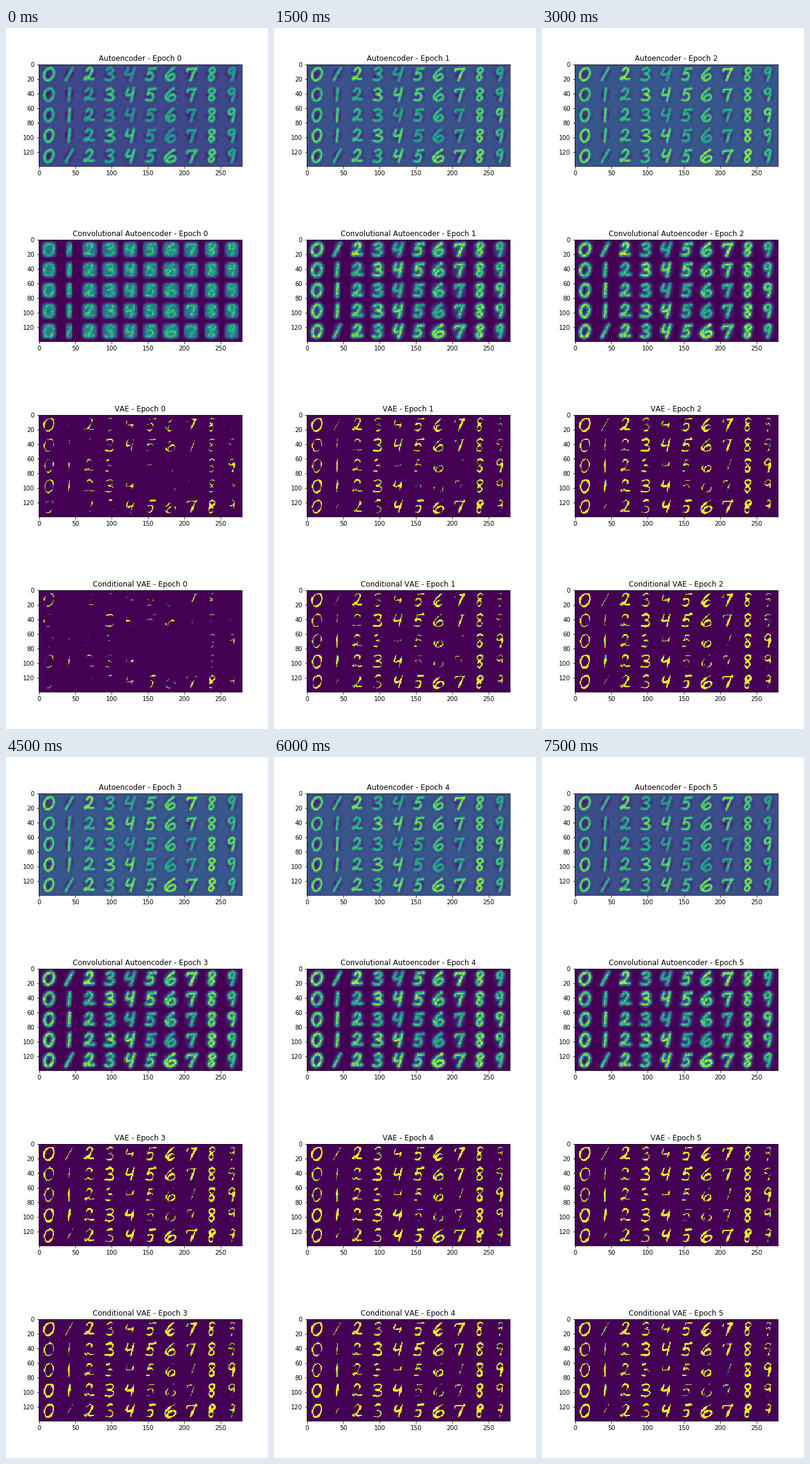
Animation of 432 by 1152 pixels, one loop 8000 ms. Source, as a matplotlib script:

```python
import numpy as np
import matplotlib.pyplot as plt
from matplotlib.animation import FuncAnimation

ROWS, COLS, CELL = 5, 10, 28
WIDTH, PANEL_H, DPI = 432, 288, 72
STEP_MS, STEPS, STEPS_PER_EPOCH = 500, 16, 3

axis = np.arange(CELL) - 13.5
Y, X = np.meshgrid(axis, axis, indexing="ij")
rng = np.random.default_rng(8)

dist = np.zeros((ROWS, COLS, CELL, CELL))
half_width = np.zeros((COLS, 1, 1))
bands = np.zeros((COLS, CELL, CELL))

# Where a weak stroke survives first.
ends, middle = -np.cos(np.pi * Y / 10), np.cos(np.pi * Y / 10)
thirds = np.cos(np.pi * Y / 4.5)


def spline(points, samples=14):
    """Catmull-Rom curve; a repeated point makes a corner."""
    p = np.array(points, float)
    p = np.vstack([p[:1], p, p[-1:]])
    t = np.linspace(0, 1, samples)[:, None]
    parts = []
    for a, b, c, d in zip(p, p[1:], p[2:], p[3:]):
        parts.append(0.5 * (2 * b + (c - a) * t
                            + (2 * a - 5 * b + 4 * c - d) * t ** 2
                            + (3 * b - a - 3 * c + d) * t ** 3))
    return np.vstack(parts)


def glyph(digit, width, keep, *strokes, lean=0.08):
    """Write one digit by five hands; the outer rows lean most."""
    curve = np.vstack([spline(s) for s in strokes])
    half_width[digit] = width
    bands[digit] = keep
    for row in range(ROWS):
        slant = 0.06 + lean * ((row - 2) / 2) ** 4
        py = curve[:, 1] * (8.5 + rng.uniform(-0.3, 0.2))
        px = curve[:, 0] * width * rng.uniform(0.88, 1.12) - slant * py
        gap = np.hypot(X[..., None] - px, Y[..., None] - py)
        dist[row, digit] = gap.min(axis=-1)


glyph(0, 6, ends,
      [(0, -1), (-.7, -.65), (-1, .1), (-.6, .85), (.1, 1), (.75, .6),
       (1, -.2), (.6, -.85), (0, -1)])
glyph(1, 1, middle, [(0, -1), (0, 1)], lean=0.5)
glyph(2, 6.5, ends,
      [(-.8, -.55), (-.2, -1), (.45, -.7), (.2, 0), (-.5, .75),
       (-.95, .75), (-.6, .45), (.1, .75), (1, .75)])
glyph(3, 7, thirds,
      [(-.7, -.75), (0, -1), (.6, -.65), (.3, -.2), (-.2, -.05),
       (-.2, -.05), (.5, .15), (.8, .55), (.2, .95), (-.8, .85)])
glyph(4, 6, middle,
      [(-.6, -.9), (-.95, -.1), (-.5, .1), (.6, -.1)],
      [(.8, -1), (.55, 0), (.3, 1)])
glyph(5, 6.4, thirds,
      [(.9, -.95), (-.3, -.85), (-.3, -.85), (-.5, -.1), (-.5, -.1),
       (.2, -.2), (.6, .3), (.2, .9), (-.8, .85)])
glyph(6, 7.6, Y / 10,
      [(.4, -1), (-.4, -.4), (-.9, .4), (-.3, 1), (.6, .8), (.8, .3),
       (.3, 0), (-.4, .4), (-.4, .8)])
glyph(7, 6.3, middle,
      [(-.9, -.5), (-.7, -.8), (.8, -.85), (.8, -.85), (.4, 0), (.05, 1)])
glyph(8, 5.8, thirds,
      [(.6, -.8), (0, -1), (-.6, -.6), (0, -.05), (.6, .5), (.1, 1),
       (-.5, .6), (0, 0), (.7, -.5), (.6, -.8)])
glyph(9, 5.8, thirds,
      [(.55, -.75), (0, -1), (-.7, -.6), (-.4, -.1), (.3, -.25),
       (.55, -.75), (.55, -.75), (.5, .1), (.2, 1)])


def ripple(seed, pitch):
    """Smooth noise, different in each cell."""
    noise = np.random.default_rng(seed)
    total = 0
    for _ in range(4):
        angle, phase = noise.uniform(0, 2 * np.pi, (2, ROWS, COLS, 1, 1))
        total = total + np.sin(
            (X * np.cos(angle) + Y * np.sin(angle)) * pitch + phase)
    return total / 2


def blocks(a):
    return a.repeat(2, axis=-2).repeat(2, axis=-1)


# How firmly each digit is rebuilt, at the last and at the first epoch.
firm = rng.uniform(0.35, 1, (ROWS, COLS, 1, 1))
start = firm - rng.uniform(0.2, 0.6, firm.shape)

gaps = ripple(1, 0.45)
grain = blocks(rng.uniform(0.75, 1.15, (ROWS, COLS, CELL // 2, CELL // 2)))
coarse = blocks(dist.reshape(ROWS, COLS, CELL // 2, 2, CELL // 2, 2)
                .mean(axis=(3, 5)))
reach = ((X / (half_width + 3)) ** 4 + (Y / 10) ** 4) ** 0.25
box = 1 / (1 + np.exp((reach - 1) * 11))
core = np.exp(-(X ** 2 + Y ** 2) / 80)


def autoencoder(epoch):
    base = 0.275 - 0.007 * (epoch - 2.8) ** 2
    pen = 1.6 + 0.5 / (1 + epoch)
    gain = (0.22 + 0.45 * firm) * (1 - 0.12 * np.exp(-epoch))
    shade = 0.18 * core * np.exp(-((dist - 4.2) / 2) ** 2)
    noise = (0.03 - 0.002 * epoch) * ripple(20 + epoch, 0.8) * (0.2 + core)
    return base + gain * np.exp(-(dist / pen) ** 2) - shade + noise


def convolutional(epoch):
    blur = 0.05 + 0.95 * np.exp(-1.8 * epoch)
    pen = 2.3 + 0.7 / (1 + epoch)
    blob = box * (0.42 + 0.3 * np.exp(-(coarse / 2) ** 2))
    d = 0.5 * (coarse + dist)
    ink = (0.5 + 0.45 * firm) * np.exp(-(d / pen) ** 2) + 0.03 * box
    return (blur * blob + (1 - blur) * ink) * grain


def variational(epoch, first, speed, seed):
    strength = firm + (first - firm) * np.exp(-speed * epoch)
    level = (1.15 * strength - 0.2 + 0.25 * bands + 0.3 * gaps
             + 0.08 * ripple(seed + epoch, 0.6))
    return 8 * (level - dist / 1.5)


def vae(epoch):
    return variational(epoch, start, 0.85, 40)


def conditional_vae(epoch):
    return variational(epoch, start - 0.2, 1.3, 60)


def sheet(cells):
    return (np.clip(cells, 0, 1).transpose(0, 2, 1, 3)
            .reshape(ROWS * CELL, COLS * CELL))


PANELS = [("Autoencoder", autoencoder),
          ("Convolutional Autoencoder", convolutional),
          ("VAE", vae),
          ("Conditional VAE", conditional_vae)]

plt.rcParams["font.family"] = "DejaVu Sans"
plt.rcParams["text.kerning_factor"] = 6
height = PANEL_H * len(PANELS)
fig = plt.figure(figsize=(WIDTH / DPI, height / DPI), dpi=DPI,
                 facecolor="white")
image_h = 0.775 * WIDTH / 2
epochs = (STEPS - 1) // STEPS_PER_EPOCH + 1
views = []
for i, (name, model) in enumerate(PANELS):
    bottom = height - PANEL_H * (i + 0.4975) - image_h / 2
    ax = fig.add_axes([0.125, bottom / height, 0.775, image_h / height])
    sheets = [sheet(model(e)) for e in range(epochs)]
    image = ax.imshow(sheets[0], cmap="viridis", vmin=0, vmax=1,
                      interpolation="nearest", aspect="auto")
    ax.set_xticks(range(0, 280, 50))
    ax.set_yticks(range(0, 140, 20))
    title = ax.set_title(f"{name} - Epoch 0", fontsize=12)
    views.append((name, sheets, image, title))


def update(step):
    epoch = step // STEPS_PER_EPOCH
    for name, sheets, image, title in views:
        image.set_data(sheets[epoch])
        title.set_text(f"{name} - Epoch {epoch}")
    return []


anim = FuncAnimation(fig, update, frames=STEPS, interval=STEP_MS,
                     repeat=True, repeat_delay=0, blit=False)
plt.show()
```
